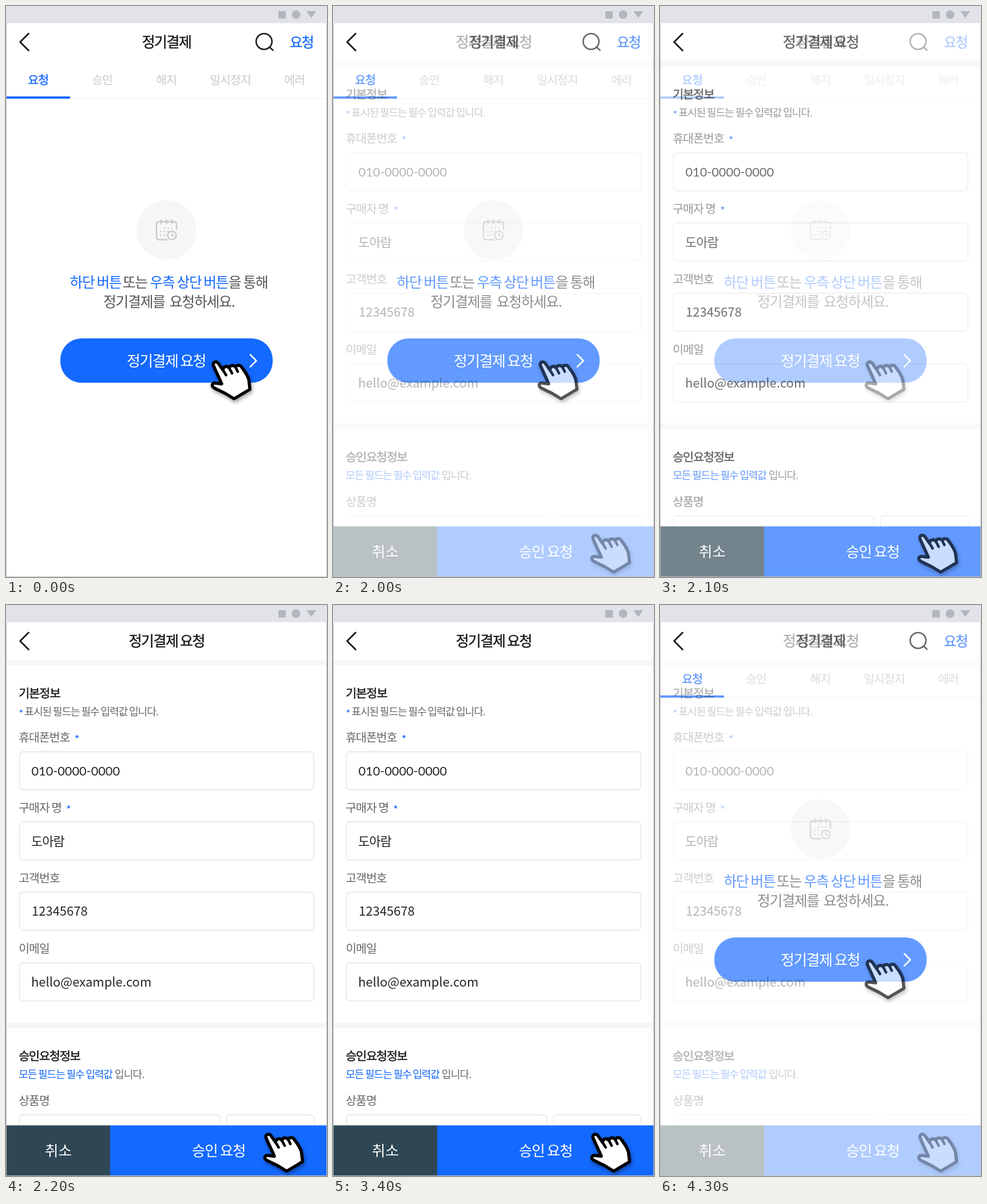
Recreate the animation shown at these times as an HTML page. Size 561 by 998 pixels, loop 4400 ms.

```html
<!DOCTYPE html>
<html lang="ko">
<head>
<meta charset="utf-8">
<title>정기결제</title>
<style>
  html, body { margin: 0; width: 100%; height: 100%; overflow: hidden; background: #fff; }
  svg { display: block; width: 561px; height: 998px; }
  text { font-family: "Noto Sans CJK KR", "Noto Sans CJK", "Noto Sans", sans-serif; white-space: pre; word-spacing: -.07em; }
  .lato { font-family: Lato, sans-serif; }
  .hand { filter: drop-shadow(2px 4px 3px rgba(0, 0, 0, .35)); }
</style>
</head>
<body>
<svg viewBox="0 0 561 998" xmlns="http://www.w3.org/2000/svg">
  <defs>
    <g id="hand" stroke="#000" stroke-width="5.5" stroke-linejoin="round" stroke-linecap="round">
      <path fill="#fff" d="M362.5 628.5C360.5 623 367 619.5 371 624.5L379 636C380 629.5 386.5 628 390 632.5C391.5 627.5 398.5 627.5 401 631C403.5 627 409.5 627 412 631.5C417 638 423 646 424.5 654L426.3 670L398.5 686.5L383 677L364.5 668C358 664.5 360 658.5 365 659L377 660.5Z"/>
      <path fill="none" stroke-width="4.6" d="M379 636L384.5 645M390 632.5L395 642M401 631L405 639"/>
    </g>
  </defs>
  <rect width="561" height="998" fill="#fff"/>

  <g id="list">
    <g fill="none" stroke="#1c1c1c" stroke-width="2.6" stroke-linecap="round">
      <circle cx="451" cy="62" r="13.8"/>
      <path d="M461 72L466.6 77.4"/>
    </g>
    <path d="M1 161.5H560" stroke="#f0f0f0"/>
    <rect x="1" y="158" width="111" height="4" fill="#1469ff"/>
    <circle cx="280.5" cy="391.5" r="52" fill="#f6f6f6"/>
    <g id="calendar" fill="none" stroke="#c8c8c8" stroke-width="2.4" stroke-linecap="round">
      <path d="M281 408.5H268q-5 0-5-5V382q0-5 5-5H293q5 0 5 5V390M271 374V380M280.5 374V380M290 374V380"/>
      <circle cx="290" cy="401" r="7.4"/>
      <path d="M290 397.5V401.5H293" stroke-width="2"/>
    </g>
    <rect x="95" y="581" width="371" height="77.5" rx="37" fill="#1469ff"/>
    <path d="M427 609.5L437.5 620L427 630.5" fill="none" stroke="#fff" stroke-width="2.6" stroke-linecap="round" stroke-linejoin="round"/>
  </g>
  <use id="listHand" class="hand" href="#hand"/>

  <g id="form">
    <path d="M1 96H560V106H1ZM1 729.5H560V740H1Z" fill="#f6f6f6"/>
    <g id="fields" fill="none" stroke="#000" stroke-opacity=".115" stroke-width="1.3">
      <path d="M23.5 909V897q0-6 6-6H367.5q6 0 6 6V909M385.5 909V897q0-6 6-6H532.5q6 0 6 6V909"/>
    </g>
    <rect x="1" y="909.5" width="181" height="87.5" fill="#2f4754"/>
    <rect x="182" y="909.5" width="378" height="87.5" fill="#1469ff"/>
  </g>
  <g id="formHand" class="hand"><use href="#hand" x="92" y="303"/></g>

  <path d="M39.4 48.3L24.7 63L39.4 77.7" fill="none" stroke="#1c1c1c" stroke-width="3" stroke-linecap="round" stroke-linejoin="round"/>
  <path d="M.5 30V997.5H560.5V30" fill="none" stroke="#c0c0c8"/>
  <rect width="561" height="30" fill="#e1e3e8"/>
  <g fill="#b2b6be">
    <rect x="476" y="9" width="13" height="13"/>
    <circle cx="507" cy="15" r="7.5"/>
    <path d="M525 9H542L533.5 21Z"/>
  </g>
</svg>
<script>
const NS = 'http://www.w3.org/2000/svg';
const $ = id => document.getElementById(id);
const BLUE = '#1467fb', DARK = '#1c1c1c', GRAY = '#666', PALE = '#c9c9c9', INK = '#252525';

function add(parent, tag, attrs) {
  const el = document.createElementNS(NS, tag);
  for (const k in attrs) el.setAttribute(k, attrs[k]);
  return parent.appendChild(el);
}

// Places text on its baseline; spacing is in em.
function write(parent, str, x, y, size, fill, spacing = 0, extra = {}) {
  const el = add(parent, 'text', { x, y, 'font-size': size, fill, 'letter-spacing': spacing * size, ...extra });
  el.textContent = str;
}

// Places Hangul by its visible left edge and vertical centre.
function label(parent, str, left, mid, size, fill, spacing = -.05, weight = 0) {
  const extra = weight ? { stroke: fill, 'stroke-width': weight } : {};
  write(parent, str, left - .04 * size, mid + .38 * size, size, fill, spacing, extra);
}

const star = (left, mid, size) => write($('form'), '*', left, mid + .57 * size, size, BLUE);

function buildList() {
  const g = $('list');
  label(g, '정기결제', 238.7, 62.5, 24.9, DARK, -.06, .5);
  label(g, '요청', 497, 62.5, 24.2, BLUE, -.07, .3);
  label(g, '요청', 39, 129, 20.5, BLUE, -.04, .4);
  [['승인', 151], ['해지', 263], ['일시정지', 357], ['에러', 487]]
    .forEach(([s, x]) => label(g, s, x, 129, 20.5, PALE));
  [['하단 버튼', 112.5, BLUE], ['또는', 205, '#555'], ['우측 상단 버튼', 252.5, BLUE], ['을 통해', 390, '#555']]
    .forEach(([s, x, c]) => label(g, s, x, 482.5, 24.7, c));
  label(g, '정기결제를  요청하세요.', 171, 517, 24.8, '#555');
  label(g, '정기결제 요청', 212, 620, 26, '#fff', -.061);

  for (let row = 0; row < 3; row++)
    for (let col = row ? 0 : 1; col < (row < 2 ? 4 : 2); col++)
      add($('calendar'), 'circle', { cx: 270.5 + col * 6.5, cy: 388 + row * 6.3, r: 1.3, fill: PALE, stroke: 'none' });
}

function buildForm() {
  const g = $('form');
  [256.5, 379, 502, 625.7].forEach(y =>
    add($('fields'), 'rect', { x: 23.5, y, width: 514.5, height: 66.5, rx: 6 }));
  label(g, '정기결제 요청', 215.7, 62.5, 24.9, DARK, -.06, .5);
  label(g, '기본정보', 23, 154, 20.8, DARK, -.05, .5);
  star(22.5, 186.5, 17);
  label(g, '표시된 필드는 필수 입력값 입니다.', 33, 186.5, 18.2, GRAY, -.061);
  [['휴대폰번호', 231], ['구매자 명', 354], ['고객번호', 477], ['이메일', 600], ['상품명', 866]]
    .forEach(([s, y]) => label(g, s, 23, y, 20.5, GRAY, -.047));
  star(119.5, 231, 19);
  star(105, 354, 19);
  write(g, '010-0000-0000', 44.5, 298, 21.7, INK, 0, { class: 'lato' });
  label(g, '도아람', 45, 412.5, 22, INK);
  write(g, '12345678', 45, 543, 22, INK);
  write(g, 'hello@example.com', 44, 666.5, 22, INK);
  label(g, '승인요청정보', 23, 788, 20.8, DARK, -.06, .5);
  label(g, '모든 필드는 필수 입력값', 23, 820, 18.2, BLUE, -.064);
  label(g, '입니다.', 190.5, 820, 18.2, GRAY, -.047);
  label(g, '취소', 69, 953.5, 25.5, '#fff', 0);
  label(g, '승인 요청', 326, 953.5, 25.5, '#fff', -.047);
}

const LOOP = 4400, HOLD = 2000, STEP = 100;

// Share of the form screen: holds, then dissolves in thirds.
function formShare(t) {
  const half = LOOP / 2;
  const late = (t % half) - HOLD;
  const part = late < 0 ? 0 : (Math.floor(late / STEP) + 1) / 3;
  return t < half ? part : 1 - part;
}

function draw(now) {
  const share = formShare(now % LOOP);
  for (const id of ['list', 'listHand']) $(id).setAttribute('opacity', 1 - share);
  for (const id of ['form', 'formHand']) $(id).setAttribute('opacity', share);
}

buildList();
buildForm();
draw(0);
let start;
requestAnimationFrame(function tick(now) {
  start ??= now;
  draw(now - start);
  requestAnimationFrame(tick);
});
</script>
</body>
</html>
```
